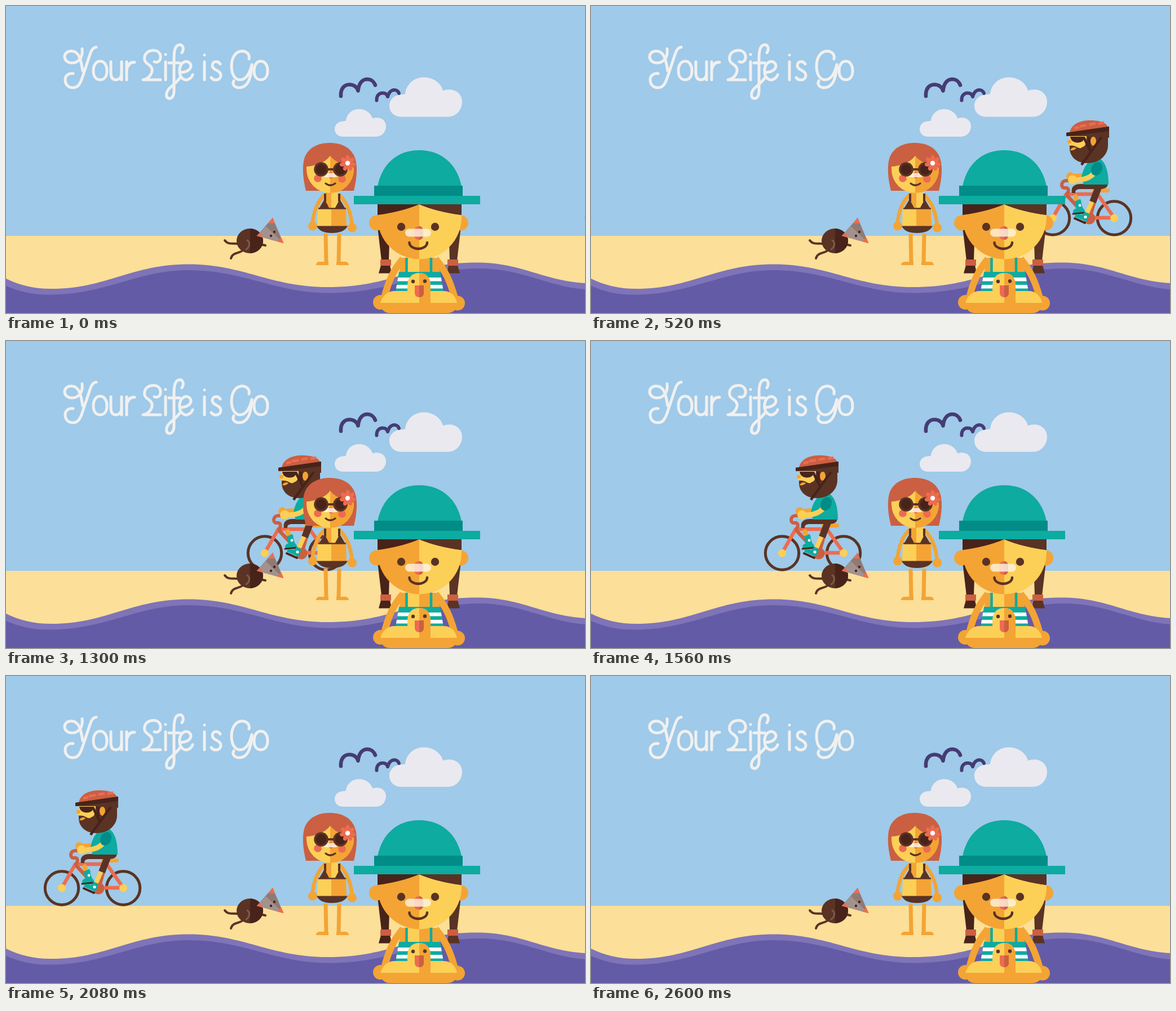
An HTML page with a canvas that plays this animation: 1027x545 px, repeating every 3.35 s.

```html
<!DOCTYPE html>
<html lang="en">
<head>
<meta charset="utf-8">
<title>Your Life is Go</title>
<style>
html, body { margin: 0; width: 100%; height: 100%; overflow: hidden; background: #9fcae9; }
canvas { display: block; width: 1027px; height: 545px; }
</style>
</head>
<body>
<canvas id="stage" width="1027" height="545" role="img" aria-label="Your Life is Go"></canvas>
<script>
const W = 1027, H = 545;
const STEP = 130, STEPS = 20, LOOP = 3350, STRIDE = 60;
const C = {
  sky: '#9fcae9', sand: '#fcdf98', sea: '#645ba7', foam: '#7e74b7',
  cloud: '#eae9ef', bird: '#453c74', brown: '#5a3324', dark: '#48231a',
  yellow: '#fccf57', orange: '#f3a434', coral: '#ec6c50', rust: '#cb5f42',
  teal: '#0daba0', deep: '#018c87', letter: '#f1f0f0'
};
const ctx = document.getElementById('stage').getContext('2d');
let g = ctx;

function fill(d, color) {
  g.fillStyle = color;
  g.fill(new Path2D(d));
}
function line(d, color, width, cap = 'round') {
  g.strokeStyle = color;
  g.lineWidth = width;
  g.lineCap = cap;
  g.lineJoin = 'round';
  g.stroke(new Path2D(d));
}
function oval(x, y, rx, color, ry = rx, turn = 0) {
  g.fillStyle = color;
  g.beginPath();
  g.ellipse(x, y, rx, ry, turn, 0, Math.PI * 2);
  g.fill();
}
function box(x, y, w, h, color, r = 0) {
  g.fillStyle = color;
  g.beginPath();
  g.roundRect(x, y, w, h, r);
  g.fill();
}
// Two-tone shape divided at a vertical line.
function split(d, x, left, right) {
  fill(d, left);
  g.save();
  g.beginPath();
  g.rect(x, 0, W, H);
  g.clip();
  fill(d, right);
  g.restore();
}
function mirrored(axis, draw) {
  draw(false);
  g.save();
  g.translate(axis * 2, 0);
  g.scale(-1, 1);
  draw(true);
  g.restore();
}

function drawLettering() {
  const strokes = [
    'M135 76C137 92 128 101 117 101C109 101 104 96 104 90C104 84 109 80 116 80C130 80 133 96 136 115',
    'M160 73C152 74 150 83 147 92L137 122C132 138 128 145 119 145C110 145 105 139 105 131C105 123 111 119 119 120',
    'M167 98C159 98 155 106 155 115C155 124 159 131 167 131C175 131 179 124 179 115C179 106 175 98 167 98Z',
    'M186 99V119C186 128 190 131 195 131C201 131 205 126 205 118M205 99V131',
    'M214 99V131M214 113C216 104 220 99 228 100',
    'M263 99C271 102 275 95 274 88C272 80 265 78 259 79C250 80 244 87 246 96C248 104 257 103 259 112C260 121 252 130 243 131H274',
    'M283 99V131M283 86V86.1',
    'M312 83C317 75 313 68 307 69C300 70 298 80 298 92V150C298 160 294 165 289 164C283 163 283 153 290 146C298 139 304 134 309 127M289 101H308',
    'M308 118C318 118 328 114 328 106C327 99 320 97 315 100C309 103 307 112 308 118C309 128 316 132 321 131C326 130 330 126 331 122',
    'M352 99V131M352 87V87.1',
    'M380 103C376 97 366 97 366 106C366 114 381 114 381 123C381 133 368 133 364 127',
    'M431 94C433 85 426 80 418 80C406 81 400 93 400 107C400 121 406 131 415 131C425 131 432 121 436 104C435 130 428 146 412 145C404 144 401 138 404 133',
    'M452 98C444 98 440 106 440 115C440 124 444 131 452 131C460 131 464 124 464 115C464 106 460 98 452 98Z'
  ];
  strokes.forEach(d => line(d, C.letter, 5));
}

function drawCloud(x, y, sx, sy) {
  g.save();
  g.translate(x, y);
  g.scale(sx, sy);
  fill('M22 71C8 71 0 62 0 51C0 39 10 31 22 31L28 30C30 12 44 0 61 0C78 0 92 11 95 24C98 23 102 22 106 22C120 22 129 32 129 44C129 59 118 71 104 71Z', C.cloud);
  g.restore();
}

function drawBackdrop() {
  box(0, 0, W, H, C.sky);
  box(0, 408, W, H, C.sand);
  fill('M0 484C25 496 50 502 80 502C180 502 220 458.5 325 458.5C420 458.5 470 499 570 499C690 499 720 455.5 835 455.5C915 455.5 950 487 1027 492V545H0Z', C.foam);
  fill('M0 497C25 507 45 512.5 75 512.5C180 512.5 230 469 325 469C420 469 480 509.5 570 509.5C690 509.5 740 466 840 466C915 466 960 498 1027 503V545H0Z', C.sea);
  drawLettering();
  drawCloud(680, 126.5, 1, 0.99);
  drawCloud(583, 183, 0.706, 0.69);
  line('M594 160C593 147 600 139.5 609 139.5C617 139.5 623 144 624.5 150.5C626 136 633 130 641 130C648 130 653 135 655 140.5', C.bird, 6.6);
  line('M657.5 167.5C657 159 662 154.5 668 154.5C673 154.5 676 157 677 161C679 153 684 149 689 149C693 149 696 152 697 155', C.bird, 6);
}

function drawBike() {
  for (const x of [219, 328]) {
    g.strokeStyle = C.brown;
    g.lineWidth = 5;
    g.beginPath();
    g.arc(x, 376.5, 29.7, 0, Math.PI * 2);
    g.stroke();
  }
  box(289, 324, 31, 7, C.orange, 3.5);
  line('M298 330L285 376', C.rust, 6, 'butt');
  line('M243 334L219 376M245 334H296M300 336L328 376H285', C.coral, 6.4);
  line('M245 337L282 377', C.rust, 6.4);
  line('M244 334C249 327 247 322 240 323C232 322 234 310 243 310H249', C.rust, 6);
  oval(219, 376.5, 7, C.yellow);
  oval(328, 376.5, 7, C.yellow);
}

function drawLegs() {
  line('M258 335L264 350', C.orange, 8, 'butt');
  line('M259 349.5L269 345.5', C.teal, 6, 'butt');
  fill('M258 352L269 348L272 358L276 363L275 367L256 368C253 363 258 360 261 359Z', C.teal);
  oval(267, 354, 2.4, '#fff');
  line('M255 369L275 367', C.dark, 3);
  oval(284, 377, 10.5, C.rust);
  line('M290 344L280 367', C.yellow, 8, 'butt');
  line('M300 322L290 348', C.brown, 12, 'butt');
  fill('M276 365L284 370L279 383L258 374C260 367 267 369 271 371Z', C.teal);
  line('M258 377L276 385', C.dark, 4);
  oval(277, 374.5, 2.6, '#fff');
  fill('M316 315C318 321 312 325 303 325H268C261 325 259 327 259 332H253C251 321 257 316 268 316Z', C.brown);
}

function drawRiderHead() {
  fill('M249 230H317V247C317 264 303 279 280 279C262 279 249 268 249 252Z', C.brown);
  fill('M249 231H279C279 242 277 250 272 250C266 257 261 246 250 248C248 246 245 245 245 242L249 236Z', C.yellow);
  oval(248.5, 241, 3.5, C.orange);
  fill('M250 256C252 251 257 250 261 252C259 255 255 257 250 256Z', C.orange);
  oval(291, 240, 5, C.orange, 8);
  fill('M250 232H275C275 239 270 242.5 264 242.5C257 242.5 251 240 250 232Z', C.dark);
  line('M274 233L286 258M283 232L284 253M306 232L270 282', C.dark, 4.5, 'butt');
  fill('M249 224C253 208 270 203 285 203C303 203 315 207 317 216L312 222Z', C.rust);
  for (const [x, y, w] of [[257, 217, 9], [267, 213.5, 12], [284, 210.5, 11], [300, 209, 10]]) {
    line(`M${x} ${y}L${x + w} ${y - 2}`, C.coral, 4.5, 'butt');
  }
  fill('M243 225L319 214V234L292 231H243Z', C.brown);
  fill('M243 225L319 214V222L280 227L243 231Z', C.dark);
}

function drawRider() {
  drawBike();
  oval(250, 302, 7, C.orange);
  line('M252 302L275 300', C.orange, 7);
  drawLegs();
  fill('M292 271H303C314 279 318 296 318 317H274C272 311 270 307 270 304C273 288 280 276 292 271Z', C.teal);
  line('M291 298C284 306 272 309 258 309', C.yellow, 9);
  oval(254, 308.5, 8, C.yellow);
  oval(297, 289, 9.5, C.deep, 12.5, 0.45);
  drawRiderHead();
}

function drawMouse() {
  line('M388 416C394 424 402 421 411 422M399 448C402 437 412 440 420 434M451 423L460 425', C.brown, 4);
  split('M409 417A23.5 22 0 1 1 456 417A23.5 22 0 1 1 409 417Z', 433, C.brown, C.dark);
  line('M428 416C433 419 433 427 426 432', '#7e5a48', 3);
  fill('M473 376L492 421L445 408Z', '#8f7a76');
  fill('M461 391L492 421L445 408Z', '#a3918e');
  fill('M473 375.5L477 386L465 386ZM492.5 421L488 410L481 418ZM444.5 408L451 402L455 411Z', C.coral);
  oval(476, 401, 2.2, C.dark);
  oval(470, 408, 2.2, C.dark);
}

function drawWoman() {
  line('M567 404L568 457M591 404L590 457', C.orange, 7, 'butt');
  fill('M550 460C550 456 553 454 557 454H572V460ZM586 460V454H601C605 454 608 456 608 460Z', C.orange);
  line('M564 336C552 348 545 367 543.5 388M592 336C604 348 612 367 614 390', C.orange, 6.5);
  oval(544, 390.5, 8, C.orange);
  oval(614, 393.5, 8, C.orange);
  split('M566 331H591C591 345 598 352 603 361H553C559 352 566 345 566 331Z', 577, C.orange, C.yellow);
  split('M553 360H603L604 391H552Z', 577, C.yellow, C.orange);
  line('M566 333V347M591 333V347', C.brown, 4, 'butt');
  fill('M565 343L574 360H555ZM592 343L602 360H583Z', C.brown);
  line('M554 359.5H603', C.brown, 2.5, 'butt');
  fill('M551 390.5H606C602 399 592 403 578 403C564 403 555 399 551 390.5Z', C.brown);

  fill('M532 328C526 304 525 282 530 268C537 251 554 243 574 243C597 243 611 252 618 267C624 281 623 304 617 328Z', C.rust);
  split('M575 266C566 278 549 284 533 285V290A42 42 0 0 0 617 290V287C600 284 583 277 575 266Z', 575, C.yellow, C.orange);
  oval(553, 306, 6.8, C.coral);
  oval(596, 307, 6.8, C.coral);
  oval(576, 300, 4, C.coral, 6.5);
  box(563, 296.5, 25, 7.5, 'rgba(255,247,232,.82)', 3.75);
  line('M567 315Q575 321.5 584 315', C.brown, 3.2);
  line('M570 290H584', C.brown, 4);
  for (const x of [559, 593]) {
    oval(x, 290, 12.8, C.brown);
    oval(x, 290, 9.2, C.dark);
  }
  for (let i = 0; i < 7; i++) {
    const a = i * Math.PI * 2 / 7 - Math.PI / 2;
    oval(606 + 9 * Math.cos(a), 279 + 9 * Math.sin(a), 5.5, C.coral, 3.8, a);
  }
  oval(606, 279, 4.2, '#fff');
}

function drawGirlBody() {
  split('M703 447H763L770 474H697Z', 733, C.orange, C.orange);
  split('M709 446H756V474H709Z', 733, C.yellow, C.orange);
  line('M710.5 447V474M754 447V474', C.teal, 4.5, 'butt');
  const top = 'M697 472H770L776 507H691Z';
  fill(top, C.teal);
  g.save();
  g.clip(new Path2D(top));
  box(690, 482, 90, 6.5, '#fff');
  box(690, 495, 90, 6.5, '#fff');
  g.restore();
  line('M704 449C687 469 678 489 671 518M762 449C779 469 788 489 796 518', C.orange, 12, 'butt');
  fill('M664 526H801C801 538 794 545 782 545H682C670 545 664 538 664 526Z', C.orange);
  oval(664, 526, 13, C.orange);
  oval(801, 527.5, 13, C.orange);
  fill('M664 527C668 514 676 506 690 506H776C788 506 797 513 800 527Z', C.yellow);
  split('M712 527V497C712 482 720 474 733 474C746 474 753 482 753 497V527Z', 733, C.yellow, C.orange);
  oval(722, 489, 3.2, C.brown);
  oval(743, 488.5, 3.2, C.brown);
  split('M725 496H741V509C741 514 738 517 733 517C728 517 725 514 725 509Z', 733, C.coral, C.rust);
}

function drawGirl() {
  mirrored(733, right => {
    const hair = right ? C.brown : C.dark;
    fill('M659 392H680V420L679 452H666Z', hair);
    fill('M665 460H681L684 474.5H661Z', hair);
    box(664, 450, 19, 11, C.rust);
  });
  drawGirlBody();
  oval(657.5, 385, 13.5, C.orange);
  oval(806.5, 385, 13.5, C.orange);
  split('M659 350H808V375A74.5 74.5 0 0 1 659 375Z', 733, C.orange, C.yellow);
  split('M659 350H808V371Q763 365 733 352Q703 365 659 371Z', 733, C.dark, C.brown);
  oval(701, 392, 7.2, C.brown);
  oval(761, 392, 7.2, C.brown);
  split('M724 400C724 394 728 391 732 391C737 391 740 394 740 400V407C740 412 737 415 732 415C728 415 724 412 724 407Z', 733, C.coral, C.rust);
  box(708, 395.5, 46, 14, 'rgba(255,246,230,.8)', 7);
  line('M715.5 420A15.7 11 0 0 0 747 420', C.brown, 4.4);
  fill('M659 320C667 281 693 256 733 256C773 256 800 281 808 320Z', C.teal);
  box(653, 319, 157, 19, C.deep);
  box(617, 337, 224, 15, C.teal);
}

function layer(...parts) {
  const canvas = document.createElement('canvas');
  canvas.width = W;
  canvas.height = H;
  g = canvas.getContext('2d');
  parts.forEach(draw => draw());
  g = ctx;
  return canvas;
}

const backdrop = layer(drawBackdrop);
const rider = layer(drawRider);
const foreground = layer(drawMouse, drawWoman, drawGirl);

// The rider advances in fixed steps from the right edge to the left.
function render(now) {
  const step = Math.min(STEPS, Math.floor((now % LOOP) / STEP));
  ctx.drawImage(backdrop, 0, 0);
  ctx.drawImage(rider, 840 - STRIDE * step, 0);
  ctx.drawImage(foreground, 0, 0);
}

const start = performance.now();
function tick() {
  render(performance.now() - start);
  requestAnimationFrame(tick);
}
tick();
</script>
</body>
</html>
```
